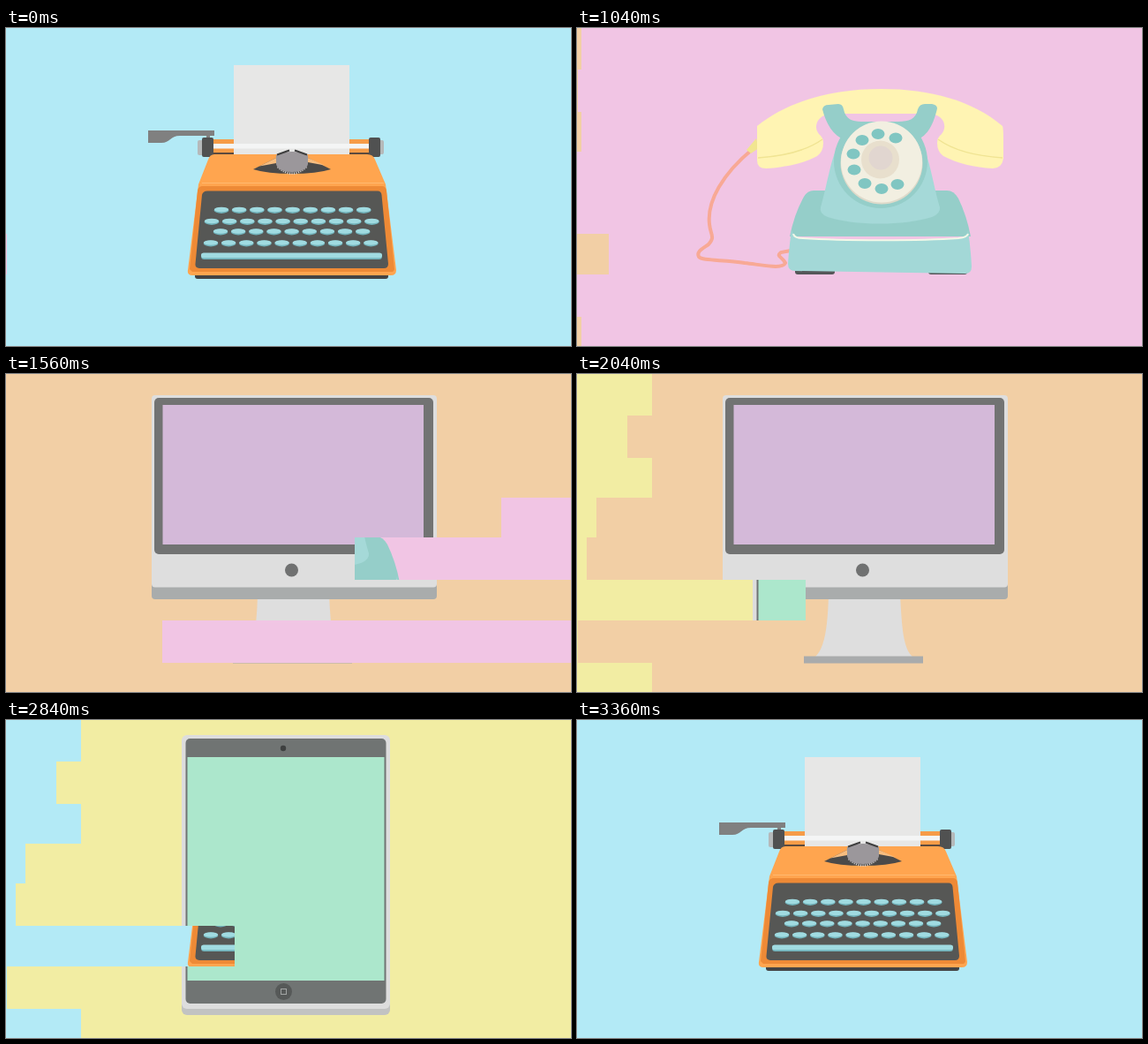
Animation, 640 px wide and 360 px high, one loop 3.4 s. Source, as an HTML page:

```html
<!DOCTYPE html>
<html lang="en">
<head>
<meta charset="utf-8">
<title>Machines</title>
<style>
  html, body { margin: 0; width: 100%; height: 100%; overflow: hidden; }
  svg { display: block; width: 640px; height: 360px; }
</style>
</head>
<body>
<svg viewBox="0 0 640 360">
  <defs>
    <clipPath id="wipe0"><path/></clipPath>
    <clipPath id="wipe1"><path/></clipPath>
    <clipPath id="wipe2"><path/></clipPath>
    <clipPath id="wipe3"><path/></clipPath>
  </defs>

  <g id="typewriter">
    <rect width="640" height="360" fill="#b3eaf6"/>
    <!-- carriage -->
    <path d="M161 116H236V122H197C186 122 186 130 176 130H161ZM227 121h4v5h-4z" fill="#808080"/>
    <rect x="217" y="127" width="8" height="17" rx="2" fill="#b5b9ba"/>
    <rect x="421" y="127" width="7" height="16" rx="2" fill="#b5b9ba"/>
    <path d="M234 126H412V143H234Z" fill="#f69c48"/>
    <path d="M234 141H412V144H234Z" fill="#5c4a3e"/>
    <rect x="258" y="42" width="131" height="101" fill="#e7e7e6"/>
    <path d="M234 131H412V136.500H234Z" fill="#f4f5f5"/>
    <rect x="222" y="124" width="13" height="22" rx="2" fill="#505151"/>
    <rect x="411" y="124" width="13" height="22" rx="2" fill="#505151"/>
    <!-- body -->
    <rect x="214" y="276" width="219" height="8" rx="3" fill="#444"/>
    <path d="M236 143H409Q416 143 418 149L430 177L442 274Q442 280 436 280H211Q205 280 206 274L218 177L229 149Q231 143 236 143Z" fill="#ffa54f"/>
    <path d="M223 179H426Q430 179 431 184L440 273Q440 278 435 278H212Q207 278 208 273L217 184Q218 179 223 179Z" fill="#ee8a36"/>
    <path d="M208 273L207 276Q207 279 212 279H435Q441 279 440 274L438 276H211Z" fill="#ffa54f"/>
    <path d="M222 175.500H428" stroke="#ffb86f"/>
    <path d="M228 184.500H421Q425 184.500 425.500 189L433 267Q433 272 428 272H219Q214 272 214.500 267L222 189Q223 184.500 228 184.500Z" fill="#565755"/>
    <!-- type basket -->
    <path d="M280 160L306 147H342L368 160Q352 165 324 165T280 160Z" fill="#4b4a49"/>
    <path d="M287 156.500L306 147V153ZM361 155.500L342 147V152Z" fill="#f7bd80"/>
    <path d="M308 157Q324 172 340 157" fill="none" stroke="#d5d1d0" stroke-width="3" stroke-dasharray="1 1.500"/>
    <path d="M306 144Q324 136 342 144V154Q340 163 324 163T306 154Z" fill="#9b979b"/>
    <path d="M307 143.500L321 138.500M327 138.500L341 143.500" stroke="#3f3f3f" stroke-width="2"/>
    <g id="keys"></g>
    <rect x="221" y="255" width="205" height="7" rx="3.500" fill="#72b3bb"/>
    <rect x="221" y="254.500" width="205" height="5.700" rx="2.800" fill="#a0dbe1"/>
  </g>

  <g clip-path="url(#wipe0)">
    <rect width="640" height="360" fill="#f1c5e4"/>
    <path d="M199 137C165 165 147 196 150 222C151 234 157 236 149 245C142 250 135 253 138 259C142 264 166 262 190 266C215 269 233 273 236 266C232 258 225 259 231 254L242 252" fill="none" stroke="#f8a995" stroke-width="4"/>
    <path d="M192 138L203 125L206 136L197 142Z" fill="#f1e590"/>
    <path d="M204 111C240 82 290 69 345 69S448 82 482 111Q483 114 483 125V148Q481 159 471 159C451 158 430 153 415 145Q408 140 408 130Q408 124 413 120C420 112 416 97 398 97H290C272 97 267 112 274 120Q279 124 279 130Q279 140 272 145C258 153 235 158 214 159Q204 159 204 150Z" fill="#fff4b3"/>
    <path d="M205 147C235 145 260 139 278 126M482 147C452 145 427 139 409 126" fill="none" stroke="#f0e493" stroke-width="1.500"/>
    <!-- base -->
    <rect x="247" y="268" width="45" height="11" rx="3" fill="#555658"/>
    <rect x="398" y="268" width="44" height="11" rx="3" fill="#555658"/>
    <path d="M268 184H419Q427 184 432 193Q441 211 446 236H241Q246 211 257 191Q261 184 268 184Z" fill="#95cec9"/>
    <path d="M243 229Q240 250 239 267Q239 275 247 275L440 278Q447 278 447 270Q446 250 443 229Q443 236 432 238C390 241 300 241 256 238Q245 237 243 229Z" fill="#a3d8d7"/>
    <path d="M245 233Q246 238 256 238C300 241 390 241 432 238Q442 237 443 233" fill="none" stroke="#f3f8e8" stroke-width="2"/>
    <!-- cradle and dial -->
    <path d="M300 125C288 142 285 172 276 203Q274 210 284 214C315 224 370 224 402 214Q412 210 411 203C402 172 399 142 387 125Z" fill="#a5d9d8"/>
    <path d="M278 92Q279 87 285 87L296 86Q301 86 302 92C304 103 312 106 322 106H364C376 106 384 103 386 92Q388 86 394 86H402Q408 87 408 91C404 108 398 122 384 127H304C290 122 282 108 278 92Z" fill="#95cec9"/>
    <circle cx="344" cy="151" r="53" fill="#95cec9" clip-path="inset(10px 0 0 0)"/>
    <circle cx="345" cy="153" r="46.500" fill="#dedaca"/>
    <circle cx="345" cy="151.500" r="46" fill="#f2efe1"/>
    <circle cx="343.500" cy="149" r="21.500" fill="#e8dfcd"/>
    <circle cx="344" cy="147" r="13.500" fill="#e1d6d0"/>
    <g id="holes" fill="#80c6c2"></g>
  </g>

  <g clip-path="url(#wipe1)">
    <rect width="640" height="360" fill="#f2cfa5"/>
    <path d="M285 250H366C368 285 369 310 380 320H270C281 310 284 285 285 250Z" fill="#dedede"/>
    <rect x="257" y="319.500" width="135" height="8" fill="#a9abac"/>
    <rect x="165" y="225" width="323" height="30" rx="4" fill="#a9acac"/>
    <rect x="165" y="24" width="323" height="217.500" rx="4" fill="#dedede"/>
    <rect x="168" y="27" width="316" height="177" rx="5" fill="#727373"/>
    <rect x="177.500" y="35" width="295.500" height="158" fill="#d4b9d9"/>
    <circle cx="323.500" cy="222" r="7.500" fill="#707171"/>
  </g>

  <g clip-path="url(#wipe2)">
    <rect width="640" height="360" fill="#f2eda3"/>
    <rect x="199" y="20" width="236" height="314" rx="6" fill="#c2c3c2"/>
    <rect x="199" y="17" width="236" height="310" rx="6" fill="#dddddd"/>
    <rect x="203.500" y="21" width="227" height="300" rx="5" fill="#707473"/>
    <rect x="205.500" y="42" width="223" height="253" fill="#ace7cc"/>
    <circle cx="314" cy="32" r="3.200" fill="#3e4040"/>
    <circle cx="314.500" cy="307.500" r="9.500" fill="#565958"/>
    <rect x="311.500" y="304.500" width="6" height="6" fill="none" stroke="#a2a5a4"/>
  </g>

  <use href="#typewriter" clip-path="url(#wipe3)"/>
</svg>

<script>
const LOOP = 3400, STEP = 40, SPAN = 14;
const edges = [0, 47, 95, 140, 185, 233, 279, 327, 360];
const delays = [3, 4, 3, 6, 7, 0, 9, 3];
const starts = [-1, 21, 41, 61];
const wipes = starts.map((_, i) => document.querySelector(`#wipe${i} path`));

const ellipse = (x, y, rx, ry, fill = '') =>
  `<ellipse cx="${x}" cy="${y}" rx="${rx}" ry="${ry}" ${fill && `fill="${fill}"`}/>`;

// Each key row: first x, y, count
let keys = '';
for (const [x, y, n] of [[244, 206, 9], [233, 219, 10], [243, 230.5, 9], [232, 243.5, 10]])
  for (let i = 0; i < n; i++) {
    const kx = x + i * 20.15;
    keys += ellipse(kx, y + .4, 8.3, 3.5, '#72b3bb') + ellipse(kx, y - .5, 8.2, 2.8, '#a0dbe1');
  }
document.getElementById('keys').innerHTML = keys;

document.getElementById('holes').innerHTML =
  [[323, 127], [341, 120], [361, 124.5], [313, 142.5], [314, 160.5], [326, 176], [345, 182], [363, 177]]
    .map(([x, y]) => ellipse(x, y, 7.5, 6)).join('');

// cubic-bezier(1, 0, 0.67, 1)
function ease(p) {
  if (p <= 0) return 0;
  if (p >= 1) return 1;
  let lo = 0, hi = 1, s;
  for (let i = 0; i < 30; i++) {
    s = (lo + hi) / 2;
    const r = 1 - s;
    if (3 * s * r * r + 2.01 * s * s * r + s ** 3 < p) lo = s; else hi = s;
  }
  return s * s * (3 - 2 * s);
}

function draw() {
  const tick = Math.floor(performance.now() % LOOP / STEP);
  wipes.forEach((path, i) => {
    const rows = delays.map((delay, r) => {
      const w = Math.round(640 * ease((tick - starts[i] - delay) / SPAN));
      return w ? `M0 ${edges[r]}H${w}V${edges[r + 1]}H0Z` : '';
    });
    path.setAttribute('d', rows.join('') || 'M0 0');
  });
  requestAnimationFrame(draw);
}
draw();
</script>
</body>
</html>
```
